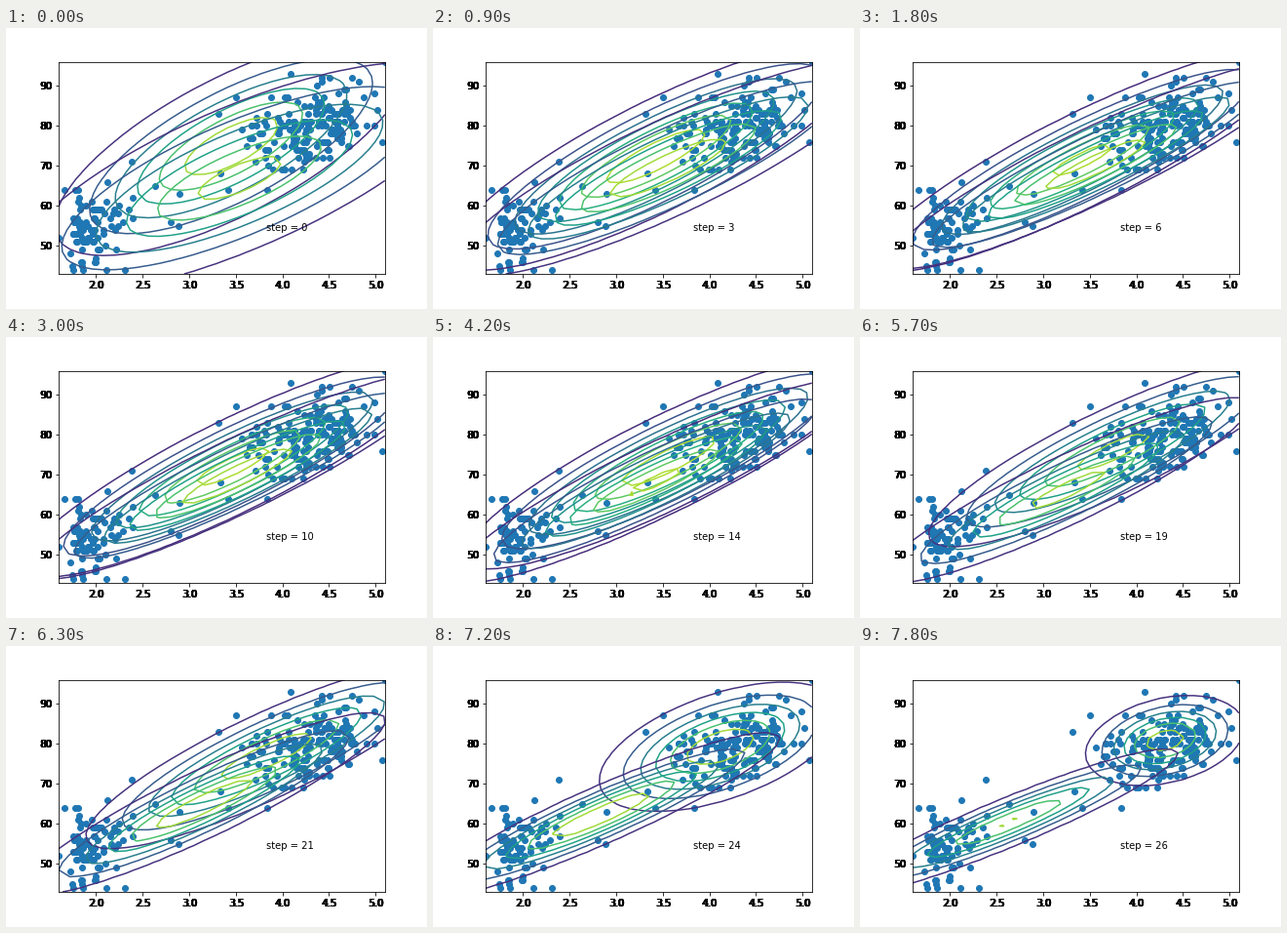
Write a matplotlib script that moves like this. It is 432 px wide and 288 px high and loops after 8000 ms.

```python
import numpy as np
import matplotlib.pyplot as plt
from matplotlib.animation import FuncAnimation

WIDTH, HEIGHT, DPI = 432, 288, 72
XLIM, YLIM = (1.6, 5.1), (43, 96)
FRAME_MS, FRAMES_PER_STEP, FRAMES = 100, 3, 80
SETTLED, SPLITTING, LAST = 6, 21, 26

# Stragglers that lie outside the two sampled clusters.
STRAGGLERS = [(1.6, 52), (1.667, 64), (2.383, 71), (2.633, 65), (2.9, 63),
              (2.8, 56), (2.883, 55), (3.333, 68), (3.417, 64), (3.833, 64),
              (3.317, 83), (3.5, 87), (4.083, 93), (5.067, 76), (5.1, 96)]

# Mean x, mean y, sigma x, sigma y, correlation: at the start, once settled,
# when the components begin to split, and at the end.
UPPER = np.array([(3.45, 74.9, 0.966, 13.9, 0.724),
                  (3.42, 71.5, 1.13, 14.0, 0.890),
                  (3.83, 76.9, 0.99, 11.8, 0.866),
                  (4.307, 80.8, 0.435, 5.75, 0.300)])
LOWER = np.array([(3.54, 66.9, 1.25, 15.0, 0.749),
                  (3.565, 70.3, 1.13, 13.3, 0.920),
                  (3.16, 65.0, 0.99, 11.6, 0.916),
                  (2.6255, 60.37, 0.96, 9.7, 0.9367)])


def sample_points():
    rng = np.random.default_rng(8)
    left_x = 1.72 + 0.95 * rng.beta(1.4, 3.6, 88)
    left_y = 54 + 9 * (left_x - 2) + rng.normal(0, 5, 88)
    z = rng.normal(size=(400, 2))
    z = z[np.hypot(*z.T) < 2.2][:168]
    right_x = 4.3 + 0.37 * z[:, 0]
    right_y = 80 + 5.6 * (0.38 * z[:, 0] + 0.92 * z[:, 1])
    far_x, far_y = np.array(STRAGGLERS).T
    return (np.concatenate([far_x, left_x, right_x]),
            np.round(np.concatenate([far_y, left_y.clip(44, 67), right_y])))


def progress(step):
    """Position along the key states: quick settling, slow drift, split."""
    if step < SETTLED:
        return 1 - (1 - step / SETTLED) ** 2
    if step < SPLITTING:
        return 1 + ((step - SETTLED) / (SPLITTING - SETTLED)) ** 1.7
    return 2 + (step - SPLITTING) / (LAST - SPLITTING)


def parameters(states, step):
    return [np.interp(progress(step), range(len(states)), column)
            for column in states.T]


def density(mx, my, sx, sy, rho):
    u, v = (grid_x - mx) / sx, (grid_y - my) / sy
    k = 1 - rho ** 2
    return (np.exp(-(u * u - 2 * rho * u * v + v * v) / (2 * k))
            / (2 * np.pi * sx * sy * np.sqrt(k)))


def add_axes(shift=0):
    axes = fig.add_axes([0.125 + shift / WIDTH, 0.125, 0.775, 0.755],
                        facecolor="none")
    axes.set(xlim=XLIM, ylim=YLIM,
             xticks=np.arange(2, 5.1, 0.5), yticks=range(50, 91, 10))
    return axes


grid_x, grid_y = np.meshgrid(np.linspace(*XLIM, 30), np.linspace(*YLIM, 30))

fig = plt.figure(figsize=(WIDTH / DPI, HEIGHT / DPI), dpi=DPI)
ax = add_axes()
ax.scatter(*sample_points())
label = ax.text(3.83, 53.72, "", fontsize=10)

# Overprinted copies of the tick labels make them heavy.
for shift in (0, 1) * 3:
    overlay = add_axes(shift)
    overlay.spines[:].set_visible(False)
    overlay.tick_params(length=0, pad=7)

contours = []


def update(frame):
    step = frame // FRAMES_PER_STEP
    while contours:
        contours.pop().remove()
    for states in (UPPER, LOWER):
        contours.append(ax.contour(grid_x, grid_y,
                                   density(*parameters(states, step))))
    label.set_text(f"step = {step}")
    return [label]


anim = FuncAnimation(fig, update, frames=FRAMES, interval=FRAME_MS,
                     repeat=True, repeat_delay=0, blit=False)
plt.show()
```
